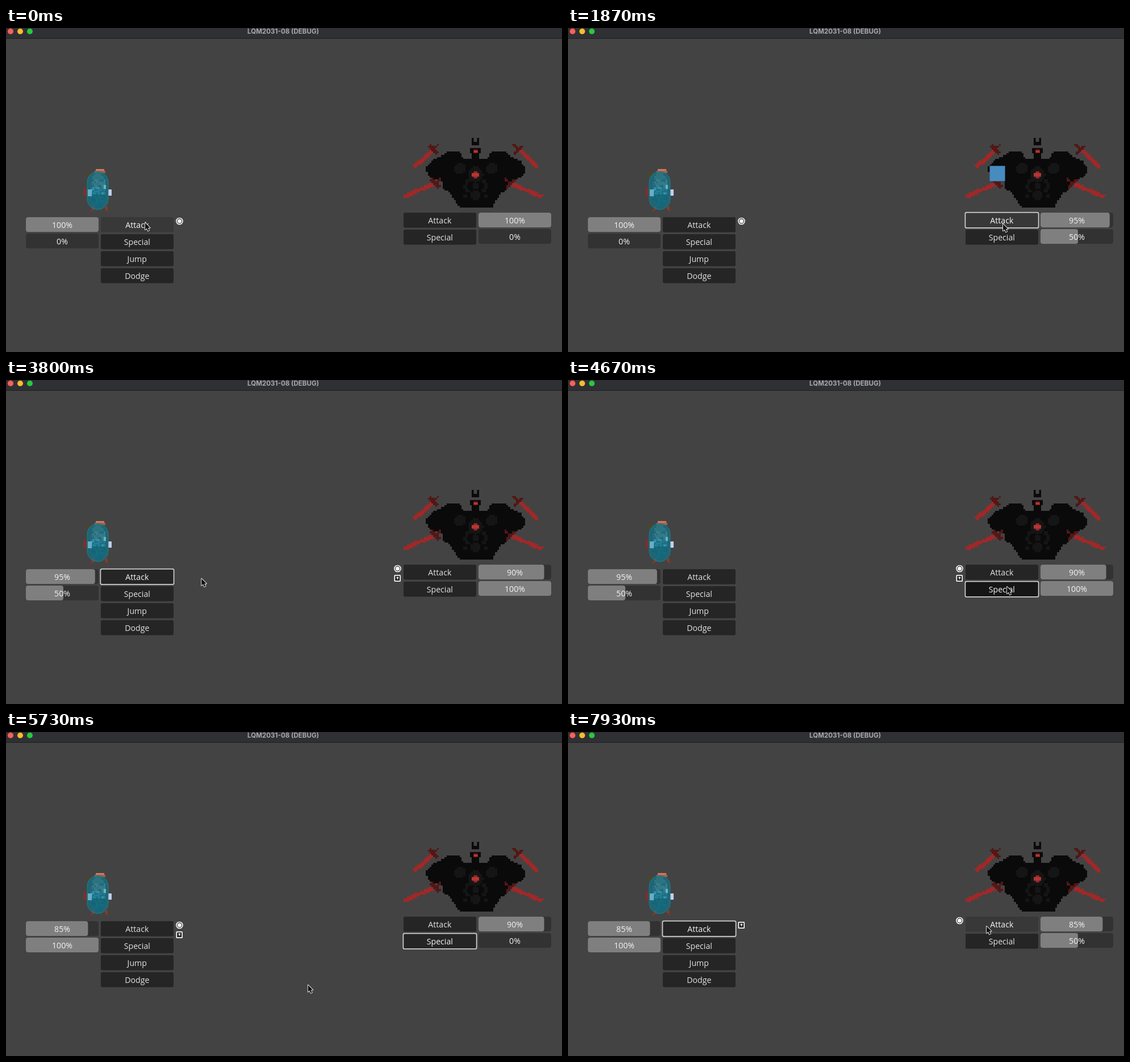
These frames come from a looping animation (979 px wide and 572 px high, 8000 ms). An HTML page with a canvas:

```html
<!DOCTYPE html>
<html lang="en">
<head>
<meta charset="utf-8">
<title>Battle prototype</title>
<style>
html, body { margin: 0; width: 100%; height: 100%; overflow: hidden; background: #434343; }
canvas { display: block; }
</style>
</head>
<body>
<canvas id="stage" width="979" height="572"></canvas>
<script>
const W = 979, H = 572, LOOP = 8000, FPS = 15;
const HOLD = 30, FLIGHT = 300, WINDUP = 212, SHOT_GAP = 286;
const LEFT = 0, RIGHT = 1, ATTACK = 0, SPECIAL = 1;
const UI_FONT = '500 14.2px "Open Sans", sans-serif';
const ctx = document.getElementById('stage').getContext('2d');

const sides = [
  { btnX: 167, barX: 35, top: 334, iconX: 305.5, aim: [155, 282], labels: ['Attack', 'Special', 'Jump', 'Dodge'] },
  { btnX: 700, barX: 832, top: 326, iconX: 689.5, aim: [827, 254], labels: ['Attack', 'Special'] }
];

const clicks = [
  { side: LEFT, item: ATTACK, at: 270 },
  { side: RIGHT, item: ATTACK, at: 1835 },
  { side: LEFT, item: ATTACK, at: 3165 },
  { side: RIGHT, item: SPECIAL, at: 4690 },
  { side: LEFT, item: ATTACK, at: 7150 }
];

// A special fires two shots after a short wind-up.
const shots = clicks.flatMap(({ side, item, at }) => item === SPECIAL
  ? [0, 1].map(i => ({ from: side, start: at + WINDUP + i * SHOT_GAP, last: i === 1 }))
  : [{ from: side, start: at }]);

const cursorStart = [245, 344];
const cursorMoves = [
  { from: 480, to: 1500, x: 766, y: 346 },
  { from: 2000, to: 3100, x: 234, y: 347 },
  { from: 3480, to: 4580, x: 773, y: 365 },
  { from: 4780, to: 5200, x: 601.5, y: 441.5 },
  { from: 5200, to: 6050, x: 500, y: 449 },
  { from: 6050, to: 6400, x: 449, y: 424 },
  { from: 6400, to: 7000, x: 245, y: 347 },
  { from: 7320, to: 7930, x: 737, y: 343 }
];

const lerp = (a, b, p) => a + (b - a) * p;
const clamp01 = p => Math.max(0, Math.min(1, p));
const smooth = p => p * p * (3 - 2 * p);

function cursorAt(t) {
  let [cx, cy] = cursorStart;
  for (const { from, to, x, y } of cursorMoves) {
    const p = smooth(clamp01((t - from) / (to - from)));
    cx = lerp(cx, x, p);
    cy = lerp(cy, y, p);
  }
  return [cx, cy];
}

function stateAt(t) {
  const s = { hp: [100, 100], sp: [0, 0], owner: LEFT, focus: null, pressed: false, live: [] };
  for (const c of clicks) {
    if (t < c.at - HOLD) break;
    s.focus = c;
    s.pressed = t < c.at;
  }
  for (const { from, start, last } of shots) {
    if (t < start) break;
    const foe = 1 - from, p = (t - start) / FLIGHT;
    s.owner = foe;
    if (p < 1) {
      const a = sides[from].aim, b = sides[foe].aim;
      s.live.push([lerp(a[0], b[0], p), lerp(a[1], b[1], p)]);
      continue;
    }
    s.hp[foe] -= 5;
    s.sp[foe] = Math.min(100, s.sp[foe] + 50);
    if (last) s.sp[from] = 0;
  }
  return s;
}

function rect(g, color, x, y, w, h, r = 0) {
  g.fillStyle = color;
  g.beginPath();
  g.roundRect(x, y, w, h, r);
  g.fill();
}

function disc(g, color, x, y, r) {
  g.fillStyle = color;
  g.beginPath();
  g.arc(x, y, r, 0, 7);
  g.fill();
}

function text(str, x, y, color, font = UI_FONT) {
  ctx.font = font;
  ctx.fillStyle = color;
  ctx.textAlign = 'center';
  ctx.fillText(str, x, y);
}

// Pixel art: fills each grid cell whose centre passes the test, snapped to whole pixels.
const CELL = 3.3;
function cells(g, color, [x0, y0, x1, y1], inside) {
  const snap = n => Math.round(n * CELL);
  for (let j = Math.floor(y0 / CELL); j < y1 / CELL; j++)
    for (let i = Math.floor(x0 / CELL); i < x1 / CELL; i++) {
      if (!inside((i + 0.5) * CELL, (j + 0.5) * CELL)) continue;
      g.fillStyle = typeof color === 'function' ? color((j + 0.5) * CELL) : color;
      g.fillRect(snap(i), snap(j), snap(i + 1) - snap(i), snap(j + 1) - snap(j));
    }
}

function pixelOval(g, color, x, y, rx, ry = rx) {
  cells(g, color, [x - rx, y - ry, x + rx, y + ry], (a, b) => Math.hypot((a - x) / rx, (b - y) / ry) < 1);
}

function pixelLine(g, color, x0, y0, x1, y1, width) {
  const dx = x1 - x0, dy = y1 - y0, len = Math.hypot(dx, dy);
  const box = [Math.min(x0, x1) - 4, Math.min(y0, y1) - 4, Math.max(x0, x1) + 4, Math.max(y0, y1) + 4];
  cells(g, color, box, (x, y) => {
    const along = ((x - x0) * dx + (y - y0) * dy) / len;
    const off = Math.abs((x - x0) * dy - (y - y0) * dx) / len;
    return along > -2 && along < len + 2 && off < width / 2;
  });
}

function drawBlade(g, cx, d, tip, hilt) {
  const x = cx + d * hilt[0], y = hilt[1];
  pixelLine(g, '#a32727', cx + d * tip[0], tip[1], x, y, 7);
  pixelLine(g, '#531616', x + 6 * d, y - 6, x - 6 * d, y + 6, 5);
  pixelLine(g, '#531616', x, y, x - 8 * d, y - 7, 4);
}

function drawEnemy(g) {
  const cx = 827, black = '#0a0a0a', plate = '#151515';
  const half = [
    [8, 231], [20, 231], [25, 224], [29, 218], [50, 217], [60, 226], [78, 234],
    [87, 247], [86, 256], [80, 264], [60, 270], [57, 283], [45, 292], [36, 304], [28, 318]
  ];
  const outline = half.map(([x, y]) => [cx + x, y])
    .concat(half.map(([x, y]) => [cx - x, y]).reverse());
  const path = new Path2D('M' + outline.join('L') + 'Z');
  cells(g, black, [740, 214, 918, 318], (x, y) => g.isPointInPath(path, x, y));

  rect(g, black, cx - 7, 201, 13, 6);
  rect(g, black, cx - 10, 212, 19, 9);
  rect(g, black, cx - 7, 220, 13, 14);
  for (const x of [cx - 7, cx + 2.5]) rect(g, black, x, 194, 3.5, 8);

  pixelOval(g, plate, cx, 258, 13);
  pixelOval(g, plate, cx, 278, 6);
  pixelOval(g, plate, cx, 295, 8);
  for (const d of [-1, 1]) {
    pixelOval(g, plate, cx + 28 * d, 248, 10);
    for (let i = 0; i < 4; i++) pixelOval(g, plate, cx + (14 + 4 * (i % 2)) * d, 270 + 9 * i, 4);
    drawBlade(g, cx, d, [107, 245], [75, 214]);
    drawBlade(g, cx - 5, d, [121, 298], [66, 274]);
  }

  rect(g, '#531616', cx - 4, 214, 8, 7);
  rect(g, '#c03030', cx - 3.5, 216, 7, 4);
  rect(g, '#8d2828', cx - 3.5, 253, 6.5, 12.5);
  rect(g, '#b83333', cx - 7, 256, 13, 6.5);
}

function seeded(seed) {
  return () => (seed = seed * 16807 % 2147483647) / 2147483647;
}

function drawPlayer(g) {
  const cx = 162, rnd = seeded(77);
  const bands = [
    { until: 266, tints: ['#6b5b55', '#55705f', '#4f6468'] },
    { until: 279, tints: ['#6c7a74', '#4f4a58', '#6b5a68'] },
    { until: 293, tints: ['#6f9fb0', '#3e5a6a', '#507888'] },
    { until: 330, tints: ['#2a4a56', '#31525c', '#2c4450'] }
  ];
  const cloth = y => bands.find(b => y < b.until).tints[Math.floor(rnd() * 3)];

  rect(g, '#4d4428', 141, 254, 6, 6);
  rect(g, '#cf7a60', cx - 4, 249, 15, 3);
  rect(g, '#a85f4c', cx - 6, 252, 19, 4);
  rect(g, '#802f2c', 137, 283, 5, 14);
  rect(g, '#c0d0ec', 180, 285, 6, 11);
  for (const d of [-1, 1]) {
    rect(g, '#84402f', cx + 3 + 11.5 * d - 2, 315, 4, 6);
    rect(g, '#793929', cx + 3 + 13.5 * d - 2, 319, 4, 5);
  }
  pixelOval(g, cloth, cx, 286, 14, 31);

  g.beginPath();
  g.roundRect(143, 253.5, 37, 67, 18.5);
  g.fillStyle = 'rgba(0,132,160,.52)';
  g.fill();
  g.strokeStyle = '#168095';
  g.lineWidth = 1;
  g.stroke();
  rect(g, '#62b0ca', 144, 285, 7, 12);
  rect(g, '#73afbd', 172, 277, 4, 7);
}

const sprites = new OffscreenCanvas(W, H);
drawEnemy(sprites.getContext('2d'));
drawPlayer(sprites.getContext('2d'));

function drawWindow() {
  rect(ctx, '#434343', 0, 0, W, H);
  rect(ctx, '#2f3034', 0, 0, W, 18);
  rect(ctx, '#1d1d1e', 0, 18, W, 1);
  ['#ff5f57', '#febc2e', '#28c840'].forEach((c, i) => disc(ctx, c, 8 + 17 * i, 6, 5));
  text('LQM2031-08 (DEBUG)', 488, 10, '#a9a9aa', '700 11.6px Inter, sans-serif');
}

function drawBar(x, y, value) {
  rect(ctx, '#323232', x, y, 128, 26, 4);
  if (value > 0) rect(ctx, '#7f7f7f', x, y, 4 + 1.24 * value, 26, 4);
  text(value + '%', x + 64, y + 19, '#f4f4f4');
}

function drawButton(side, item, s, [cx, cy]) {
  const x = sides[side].btnX, y = sides[side].top + 30 * item;
  const focused = s.focus && s.focus.side === side && s.focus.item === item;
  const over = cx >= x && cx < x + 128 && cy >= y && cy < y + 27;
  const fill = focused && s.pressed ? '#161616' : over ? '#383838' : '#252525';
  rect(ctx, fill, x, y, 128, 26.5, 2.5);
  if (focused) {
    ctx.strokeStyle = '#d0d0d0';
    ctx.lineWidth = 1.7;
    ctx.beginPath();
    ctx.roundRect(x - 0.6, y - 0.3, 129.2, 27.2, 2.5);
    ctx.stroke();
  }
  text(sides[side].labels[item], x + 63.8, y + 19, focused || over ? '#f5f5f5' : '#e2e2e2');
}

function drawTurnIcon(x, y) {
  disc(ctx, '#fff', x, y, 6.3);
  disc(ctx, '#222', x, y, 4.7);
  disc(ctx, '#fff', x, y, 3.6);
}

function drawReadyIcon(x, y) {
  rect(ctx, '#fff', x - 6, y - 6, 11.5, 12, 1.5);
  rect(ctx, '#222', x - 4.3, y - 4.3, 8.2, 8.6);
  rect(ctx, '#fff', x - 1.8, y - 2.4, 3.4, 2);
  rect(ctx, '#fff', x - 0.8, y - 0.8, 1.6, 2.6);
}

function drawSide(side, s, cursor) {
  const { barX, top, iconX, labels } = sides[side];
  drawBar(barX, top, s.hp[side]);
  drawBar(barX, top + 29, s.sp[side]);
  labels.forEach((_, i) => drawButton(side, i, s, cursor));
  const icons = [];
  if (s.owner === side) icons.push(drawTurnIcon);
  if (s.sp[side] === 100) icons.push(drawReadyIcon);
  icons.forEach((icon, i) => icon(iconX, top + 7 + 17 * i));
}

const arrow = new Path2D('M0 0V12.2L2.8 9.6L4.9 14.3L7.1 13.3L5 8.8H8.7Z');
function drawCursor([x, y]) {
  ctx.save();
  ctx.translate(x, y);
  ctx.lineJoin = 'round';
  ctx.lineWidth = 1.8;
  ctx.strokeStyle = '#f0f0f0';
  ctx.stroke(arrow);
  ctx.fillStyle = '#111';
  ctx.fill(arrow);
  ctx.restore();
}

function draw(t) {
  const s = stateAt(t), cursor = cursorAt(t);
  drawWindow();
  ctx.drawImage(sprites, 0, 0);
  drawSide(LEFT, s, cursor);
  drawSide(RIGHT, s, cursor);
  for (const [x, y] of s.live) rect(ctx, '#478cbf', x - 13.5, y - 13.5, 27, 27);
  drawCursor(cursor);
}

const origin = performance.now();
function tick() {
  const t = (performance.now() - origin) % LOOP;
  // Time advances in whole steps; the small lead absorbs rounding.
  const step = Math.min(LOOP * FPS / 1000 - 1, Math.floor((t + 4) * FPS / 1000));
  draw(step * 1000 / FPS);
  requestAnimationFrame(tick);
}
tick();
</script>
</body>
</html>
```
